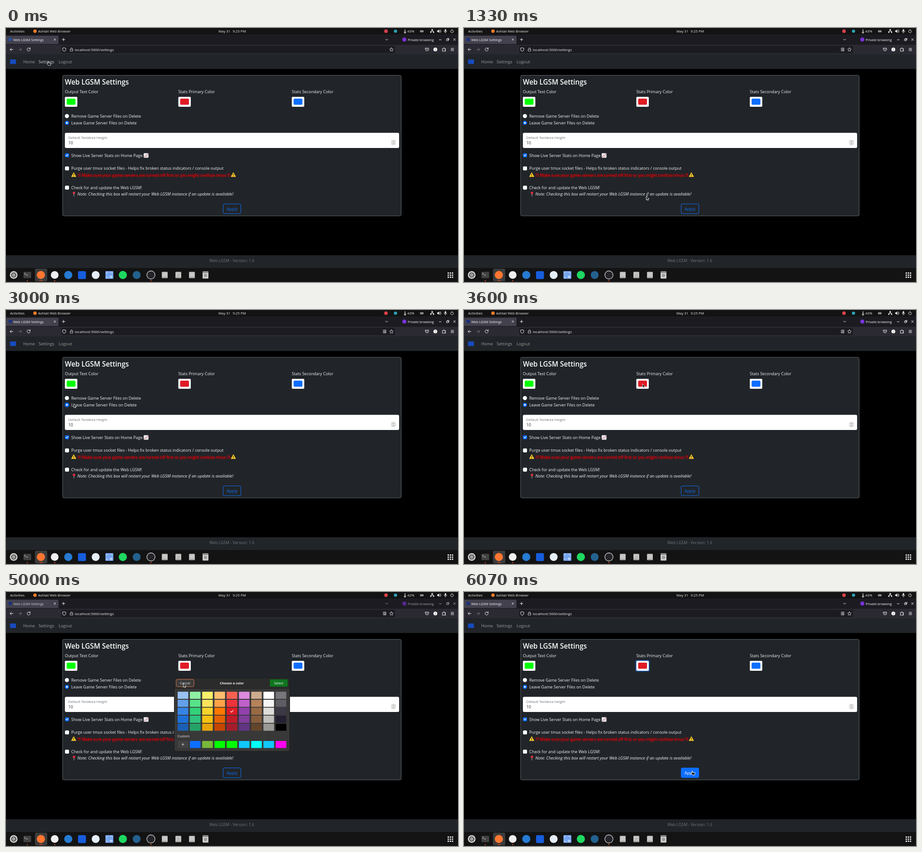
Recreate the animation shown at these times as an HTML page. Size 998x561 px, loop 6130 ms.

```html
<!DOCTYPE html>
<html lang="en">
<head>
<meta charset="utf-8">
<title>Web LGSM Settings</title>
<style>
  html, body { margin: 0; width: 100%; height: 100%; overflow: hidden; background: #000; }
  svg { display: block; width: 100vw; height: 100vh; }
  text { font-family: "Open Sans", "Noto Sans", sans-serif; white-space: pre; }
  .warn { text-shadow: 1px 1px 2px #f00; }
</style>
</head>
<body>
<svg id="stage" viewBox="0 0 998 561"></svg>
<script>
const LOOP = 6130, FPS = 15;
const BLUE = '#0d6efd', PANEL = '#212529', PALE = '#f4f4f5';

const rect = (x, y, w, h, fill, r = 0, extra = '') =>
  `<rect x="${x}" y="${y}" width="${w}" height="${h}" rx="${r}" fill="${fill}" ${extra}/>`;
const disc = (x, y, r, fill, extra = '') =>
  `<circle cx="${x}" cy="${y}" r="${r}" fill="${fill}" ${extra}/>`;
const line = (d, color = PALE, width = 1, extra = '') =>
  `<path d="${d}" fill="none" stroke="${color}" stroke-width="${width}" stroke-linecap="round" stroke-linejoin="round" ${extra}/>`;
const shape = (d, fill, extra = '') => `<path d="${d}" fill="${fill}" ${extra}/>`;
const text = (x, y, size, fill, str, extra = '') =>
  `<text x="${x}" y="${y}" font-size="${size}" fill="${fill}" ${extra}>${str}</text>`;
const group = (id, body, extra = '') => `<g id="${id}" ${extra}>${body}</g>`;
const middle = 'text-anchor="middle"';

function systemBar() {
  return rect(0, 0, 998, 14, '#131313')
    + text(9, 10, 7.8, '#eee', 'Activities')
    + disc(64, 7, 3.8, '#ff7d2a')
    + text(71, 10, 7.5, '#eee', 'Ashtail Web Browser')
    + text(469, 10, 7.8, '#eee', 'May 31') + text(500.5, 10, 7.8, '#eee', '9:25 PM')
    + disc(839, 7, 4, '#d6404a') + disc(860, 7, 3.6, '#2ba3b8')
    + line('M881 3.5v4M879.8 8.5a1.6 1.6 0 1 0 2.4 0', '#eee', 1.3)
    + text(886, 10, 7.8, '#eee', '43%', 'id="battery"')
    + rect(914, 5, 8, 4.5, '#8b8b8b', 1)
    + line('M941 4v3M938 10V7h6v3', '#eee') + rect(939.5, 2.5, 3, 3, '#eee')
    + rect(936.7, 8, 2.6, 2.6, '#eee') + rect(942.7, 8, 2.6, 2.6, '#eee')
    + shape('M952 5.5h2l2.5-2.5v8L954 8.500h-2z', '#eee') + line('M958 5q1.400 2 0 4M959.500 3.500q2.500 3.500 0 7', '#eee', .8)
    + rect(968.7, 2.5, 3, 5.5, '#eee', 1.5) + line('M967 6.500q0 3 3.200 3t3.200-3M970.200 9.500v2', '#eee', .8)
    + line('M983 4.500a3.300 3.300 0 1 0 3.600 0M984.800 3v3.500', '#eee');
}

function browserBars() {
  const title = text(16, 28.500, 7.5, '#fbfbfe', 'Web LGSM Settings');
  const controls = line('M838 24.500l2.500 2.500 2.500-2.500')
    + disc(879.500, 25.500, 4.500, '#7a32d9')
    + text(887, 28.500, 7.45, '#fbfbfe', 'Private browsing')
    + line('M956.500 26h4.500M973 24.500h3.500v3.500h-3.500zM974.500 24.500V23h3.500v3.500h-1.500M988 23.300l4.500 4.500M992.500 23.300l-4.500 4.500');
  return rect(0, 14, 998, 23, '#1c1b22')
    + rect(0, 17, 116, 18.500, '#42414d', 2)
    + rect(6, 22, 6.500, 6.500, '#172f86', 1, 'id="favicon"')
    + group('tabTitle', title)
    + line('M106 23.700l3.600 3.600M109.600 23.700l-3.600 3.600M124 25.500h6M127 22.500v6')
    + group('controls', controls)
    + rect(0, 37, 998, 21, '#2b2a33')
    + rect(122, 39.500, 737, 16, '#1c1b22', 2)
    + line('M15.500 47.500H9M12 44.500l-3 3 3 3')
    + line('M28 47.500h6.500M31.500 44.500l3 3-3 3', '#77767e')
    + line('M53 45.500a3.500 3.500 0 1 0 .5 2.500M53.500 43.500v2.500h-2.500')
    + line('M128.500 43.700l3.500 1v3q-.5 3-3.500 4-3-1-3.500-4v-3z')
    + line('M142 47h5.500v4H142zM143 47v-1.500a1.700 1.700 0 0 1 3.500 0V47', '#c6c6cb')
    + text(152, 50.500, 8, PALE, 'localhost:5000/settings')
    + group('reader', line('M833.500 44.200h5.500v6.500h-5.500zM835 46.200h2.500M835 47.700h2.500M835 49.200h2.500', PALE, .8))
    + line('M851 43.500l1.200 2.500 2.800.4-2 2 .5 2.800-2.500-1.300-2.500 1.300.5-2.800-2-2 2.800-.4z', PALE, .8)
    + line('M926 44.500h7v2.500a3.500 3.500 0 0 1-7 0zM928 46.500l1.500 1.500 1.500-1.500')
    + disc(948, 47.500, 4.300, '#fff') + text(948, 50, 6.500, '#333', 'J', middle)
    + line('M964 45.500h2v-1.500h2v1.500h2.500v2.200h-1.500v1.500h1.500v2H964z')
    + line('M982.500 45h6M982.500 47.500h6M982.500 50h6');
}

function option(y, label) { return text(144, y + 3, 9, PALE, label); }
function checkbox(y, checked) {
  return rect(130.300, y - 4.300, 8.800, 8.800, checked ? BLUE : '#fff', 2)
    + (checked ? line(`M132.500 ${y}l1.700 1.800 2.800-3.300`, '#fff', 1.200) : '');
}
function radio(id, y) {
  return group(id, disc(134.500, y, 6, '#0d6efd', 'class="glow" opacity=".4"')
    + disc(134.500, y, 4.500, '#fff', 'class="face"') + disc(134.500, y, 1.900, '#fff'));
}
function colorButton(x, label, color) {
  return text(x, 143.500, 9, PALE, label)
    + rect(x, 152, 27.500, 22, '#fff', 2) + rect(x + 4, 156, 19.500, 13.500, color, 2.500);
}
function warningSign(x) {
  return shape(`M${x} 319.300l5 9h-10z`, '#ffc928', 'stroke="#ffc928" stroke-linejoin="round"')
    + line(`M${x} 322.500v3M${x} 327.300v.1`, '#222', 1.200);
}

function page() {
  return rect(0, 58, 998, 472, '#000')
    + rect(0, 58, 998, 32.500, PANEL)
    + rect(9, 69.500, 13, 10, '#174bc0', 1)
    + text(38, 78, 9.1, '#9b9d9f', 'Home')
    + text(72, 78, 9.3, '#9b9d9f', 'Settings', 'id="navSettings"')
    + text(116, 78, 9.2, '#9b9d9f', 'Logout')
    + rect(125, 104.500, 747.500, 310.500, PANEL, 3, 'stroke="#6c7278" stroke-width=".9"')
    + text(130, 125, 15.3, '#fff', 'Web LGSM Settings', 'font-weight="600"')
    + rect(378.500, 150, 31.500, 26, '#164a98', 4, 'id="swatchRing"')
    + colorButton(130, 'Output Text Color', '#0f0')
    + colorButton(380.500, 'Stats Primary Color', '#e01b24')
    + colorButton(631, 'Stats Secondary Color', BLUE)
    + radio('remove', 194.500) + option(195, 'Remove Game Server Files on Delete')
    + radio('leave', 209.500) + option(210, 'Leave Game Server Files on Delete')
    + rect(130, 231.500, 738, 33.500, '#fff', 3)
    + text(137.500, 244.500, 7.8, '#6c7278', 'Default TextArea Height')
    + text(137.500, 256.500, 9, PANEL, '10')
    + rect(851, 248, 9, 10, '#eee', 2, 'stroke="#aaa" stroke-width=".6"')
    + line('M853.800 251.500l1.700-1.500 1.700 1.500M853.800 254.500l1.700 1.500 1.700-1.500', '#555', .8)
    + checkbox(281, true) + option(281.500, 'Show Live Server Stats on Home Page')
    + rect(304, 276.500, 10.500, 10, '#f2f3f4', 1)
    + line('M306.500 276.500v10M309 276.500v10M311.500 276.500v10M304 279.500h10.500M304 283h10.500', '#b9cbd8', .4)
    + line('M305 285l2.500-3 2 1.500 4-6', '#d8424e', 1)
    + checkbox(310, false)
    + option(310, 'Purge user tmux socket files - Helps fix broken status indicators / console output')
    + warningSign(149.500)
    + text(157.500, 327.500, 9, '#c9000b', '!!! Make sure your game servers are turned off first or you might confuse tmux !!!', 'class="warn"')
    + warningSign(502)
    + checkbox(352.500, false) + option(353, 'Check for and update the Web LGSM!')
    + line('M150 366v5.500', '#aeb4b8', 1.100) + disc(150, 364.300, 2.700, '#dd2e44')
    + text(157.500, 370, 9.25, PALE, 'Note: Checking this box will restart your Web LGSM instance if an update is available!', 'font-style="italic"')
    + rect(479.500, 388.500, 39, 21.500, 'none', 2.500, `id="applyBox" stroke="${BLUE}"`)
    + text(499, 402.500, 9.2, BLUE, 'Apply', `id="applyText" ${middle}`)
    + rect(0, 502, 998, 28, PANEL)
    + text(449, 517, 8.8, '#72777c', 'Web LGSM - Version: 1.6');
}

function dock() {
  const drive = x => rect(x - 6.500, 538.500, 13, 14, '#b9b9b7', 1.500)
    + rect(x - 5, 540, 10, 9, '#c8c8c6', 1) + line(`M${x - 3.500} 550.700h7`, '#8d8d8b', .7);
  const dots = Array.from({ length: 9 }, (_, i) =>
    rect(975 + i % 3 * 4.700, 539.700 + Math.floor(i / 3) * 4.700, 3, 3, '#eee', .8)).join('');
  return rect(0, 530, 998, 31, '#131313')
    + rect(64, 531.500, 27, 28, '#3c3c3c', 3)
    + disc(17, 545.500, 8.500, '#d9d9d7') + disc(17, 545.500, 5, 'none', 'stroke="#444" stroke-width="2.500" stroke-dasharray="2 1.140"')
    + disc(17, 545.500, 3.500, 'none', 'stroke="#444" stroke-width="1.200"') + disc(17, 545.500, 1.200, '#444')
    + rect(38.500, 538.500, 17, 14, '#424242', 1.500) + line('M41 541.500l2 1.500-2 1.500M44.500 545.500h3', '#eee', .9)
    + disc(77, 545.500, 9, '#ff7631')
    + disc(107.500, 545.500, 8.500, '#f1eef2')
    + disc(137.500, 545.500, 9, '#267bd2')
    + rect(159, 537, 17.500, 17.500, '#175ddc', 3)
    + disc(198, 545.500, 8.700, '#e5edf6')
    + rect(219.500, 537, 17.500, 17, '#76a5f0', 1.500) + line('M222 543v-3.500h4M230 539.500h4v3.500M222 548v3.500h4', '#dce9ff', .8, 'stroke-dasharray="1.500 1"')
    + line('M232 546.500v6M229 549.500h6', '#fff')
    + disc(258, 545.500, 9, '#1ed760')
    + disc(288.500, 545.500, 8.700, '#24618f')
    + disc(320, 545.500, 9, '#24242a', 'stroke="#d5d5d8" stroke-width="1.300"')
    + [350.500, 380.500, 410.500].map(drive).join('')
    + line('M378.500 544.500h4v-2M382.500 546.500h-4v2', '#999', .8)
    + rect(434, 537.500, 13, 16, '#c9c9c7', 1.500) + rect(434, 537.500, 13, 3.500, '#8c8c8a', 1)
    + disc(440.500, 546.500, 2.200, 'none', 'stroke="#666" stroke-width="1.200"')
    + [47, 75.500, 79.500, 107.500, 320].map(x => disc(x, 558, 1.200, '#e95420')).join('')
    + dots;
}

function dialog() {
  const palette = [
    '99c1f1 62a0ea 3584e4 1c71d8 1a5fb4', '8ff0a4 57e389 33d17a 2ec27e 26a269',
    'f9f06b f8e45c f6d32d f5c211 e5a50a', 'ffbe6f ffa348 ff7800 e66100 c64600',
    'f66151 ed333b e01b24 c01c28 a51d2d', 'dc8add c061cb 9141ac 813d9c 613583',
    'cdab8f b5835a 986a44 865e3c 63452c', 'ffffff f6f5f4 deddda c0bfbc 9a9996',
    '77767b 5e5c64 3d3846 241f31 000000'];
  const custom = '424242 0d6efd 78b83a 00ff00 00ff00 10c8fa 00ffff 10c8fa ff00f0'.split(' ');
  const column = i => 379 + i * 27.05;
  const swatches = palette.map((shades, i) => shades.split(' ').map((c, j) =>
    rect(column(i), 220.300 + j * 17.600, 23.500, 15.800, '#' + c, 1)).join('')).join('');
  return rect(371.500, 189.500, 255, 162.500, '#383838', 4, 'stroke="#191919"')
    + shape('M372 213.500V194q0-4 4-4h246q4 0 4 4v19.500z', '#2b2b2b')
    + line('M372 213.500h254', '#202020', .8)
    + rect(376, 193, 39, 16, '#3b3b3b', 2.500, 'id="cancel" stroke="#191919"')
    + text(395.500, 203.700, 7.4, '#eee', 'Cancel', middle)
    + text(498.800, 203.700, 7.3, '#f4f4f4', 'Choose a color', `${middle} font-weight="700"`)
    + rect(582.500, 193, 39.500, 16, '#11751f', 2.500, 'stroke="#0c5317"')
    + text(602, 203.700, 7.5, '#fff', 'Select', middle)
    + swatches + line('M496 263.500l2 2.200 4-4.500', '#fff', 1.200)
    + text(378.500, 320.500, 7.5, '#eee', 'Custom')
    + custom.map((c, i) => rect(column(i), 329, 23.500, 15.500, '#' + c, 1)).join('')
    + line('M388 336.700h5M390.500 334.200v5', '#ddd', .9);
}

function cursors() {
  const outline = 'stroke="#f5f5f5" stroke-width=".9" stroke-linejoin="round"';
  return group('arrow', shape('M0 0v8.500l2-1.800 1.300 2.800 1.500-.7-1.300-2.700h2.700z', '#161616', outline))
    + group('hand', shape('M-.8 1q.9-1.200 1.700 0v3l4 .7q1.200.3 1 1.600l-.7 3.200H.5L-2.300 6q.2-1.400 1.500-.2z', '#161616', outline));
}

const stage = document.getElementById('stage');
stage.innerHTML = systemBar() + browserBars() + page() + dock()
  + group('dialog', dialog()) + cursors();
const ui = id => document.getElementById(id);
const show = (id, visible) => ui(id).setAttribute('visibility', visible ? 'visible' : 'hidden');
const set = (id, name, value) => ui(id).setAttribute(name, value);

// Pointer stops: time, x, y
const stops = [
  [0, 93, 73], [130, 93, 73], [640, 608, 508], [760, 608, 508],
  [1870, 135, 194], [2500, 135, 194], [2730, 135, 207], [2860, 135, 207],
  [3000, 149.500, 207], [3460, 394, 163], [3600, 394, 163], [3930, 567.500, 231],
  [4200, 567.500, 231], [4870, 391.500, 202], [5200, 391.500, 202],
  [6000, 504, 394.500], [LOOP, 504, 394.500]];

function pointerAt(t) {
  const i = Math.max(1, stops.findIndex(s => s[0] >= t));
  const [t0, x0, y0] = stops[i - 1], [t1, x1, y1] = stops[i];
  const p = (t - t0) / (t1 - t0), e = p * p * (3 - 2 * p);
  return [x0 + (x1 - x0) * e, y0 + (y1 - y0) * e];
}

function setRadio(id, checked, focused) {
  ui(id).querySelector('.face').setAttribute('fill', checked ? BLUE : '#fff');
  ui(id).querySelector('.glow').setAttribute('visibility', focused ? 'visible' : 'hidden');
}

function render(t) {
  const [x, y] = pointerAt(t);
  const onApply = t >= 5920;
  const hand = t < 860 || onApply;
  const open = t >= 3640 && t < 5200;
  const removing = t >= 1990 && t < 2790;

  show('hand', hand);
  show('arrow', !hand);
  set(hand ? 'hand' : 'arrow', 'transform', `translate(${x} ${y})`);
  show('dialog', open);
  set('tabTitle', 'opacity', open ? .75 : 1);
  set('controls', 'opacity', open ? .6 : 1);
  set('cancel', 'stroke', t >= 4800 ? '#d9764f' : '#191919');
  show('reader', t >= 330);
  set('favicon', 'fill', t < 200 ? '#2451a8' : '#172f86');
  set('navSettings', 'fill', t < 200 ? '#c5c7c8' : '#9b9d9f');
  setRadio('remove', removing, removing);
  setRadio('leave', !removing, t >= 2790 && t < 3530);
  show('swatchRing', t >= 5200);
  set('applyBox', 'fill', onApply ? BLUE : 'none');
  set('applyText', 'fill', onApply ? '#fff' : BLUE);
  ui('battery').textContent = t >= 4470 && t < 5600 ? '42%' : '43%';
}

function tick() {
  const t = performance.now() % LOOP;
  render(Math.floor(t * FPS / 1000) * 1000 / FPS);
  requestAnimationFrame(tick);
}
tick();
</script>
</body>
</html>
```
